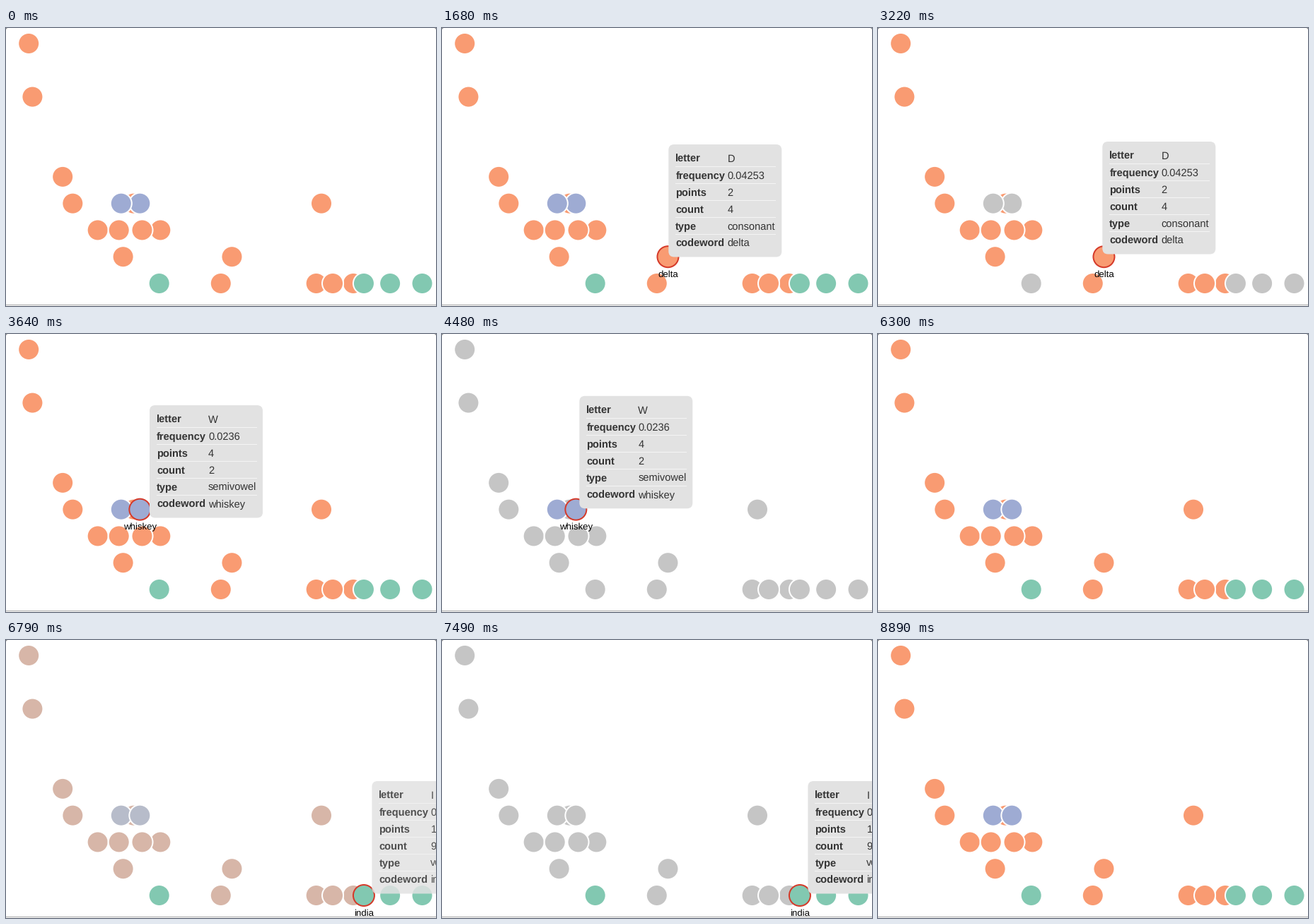
A matplotlib script for the animation above (9380 ms loop, 608 by 394 pixels).

```python
import matplotlib.pyplot as plt
from matplotlib.animation import FuncAnimation
from matplotlib.patches import Circle, FancyBboxPatch, Polygon, Rectangle
from matplotlib.transforms import Affine2D
import numpy as np

W, H, DPI = 608, 394, 100
FRAMES, INTERVAL = 134, 70
PT = 72 / DPI

plt.rcParams["font.family"] = "Liberation Sans"
plt.rcParams["text.hinting"] = "none"

COLORS = {
    "consonant": np.array([249, 155, 114]) / 255,
    "semivowel": np.array([158, 171, 211]) / 255,
    "vowel": np.array([130, 200, 177]) / 255,
}
GRAY = np.array([197, 197, 197]) / 255
RED = "#d53a2a"

# Letters grouped by type in drawing order: letter -> (frequency, points)
LETTERS = {
    "consonant": {
        "B": (.01492, 3), "C": (.02782, 3), "D": (.04253, 2), "F": (.0223, 4),
        "G": (.02015, 2), "H": (.06094, 4), "J": (.00153, 8), "K": (.00772, 5),
        "L": (.04025, 1), "M": (.02406, 3), "N": (.06749, 1), "P": (.01929, 3),
        "Q": (.00095, 10), "R": (.05987, 1), "S": (.06327, 1), "V": (.00978, 4),
        "X": (.0015, 8), "Z": (.00074, 10),
    },
    "semivowel": {"W": (.0236, 4), "Y": (.01974, 4)},
    "vowel": {"A": (.08167, 1), "I": (.06966, 1), "O": (.07507, 1), "U": (.02758, 1)},
}

FIELDS = ["letter", "frequency", "points", "count", "type", "codeword"]
DETAILS = {
    "D": ["D", "0.04253", "2", "4", "consonant", "delta"],
    "W": ["W", "0.0236", "4", "2", "semivowel", "whiskey"],
    "I": ["I", "0.06966", "1", "9", "vowel", "india"],
}

# Hovered letter: first and last frame
HOVERS = {"D": (1, 46), "W": (50, 81), "I": (95, 123)}
# Tooltip fades: in from/to, out from/to
TIP_FADES = {"D": (0, 3, 46, 49), "W": (49, 52, 80, 84), "I": (94, 98, 122, 126)}
# Tooltip corner: start, end, frames of the move
TIP_MOVES = {
    "D": ((320.3, 165), (317.3, 161), 24, 27),
    "W": ((203, 101), (194.3, 87.8), 60, 63),
    "I": ((517.4, 200), (517.4, 200), 95, 98),
}
# Selected type: on from/to, off from/to
SELECTIONS = {
    "consonant": (25, 30, 46, 51),
    "semivowel": (60, 64, 80, 86),
    "vowel": (94, 99, 122, 127),
}
W_RAISED = 50


def ease(k, a, b):
    p = min(max((k - a) / (b - a), 0), 1)
    return p * p * (3 - 2 * p)


def pulse(k, a, b, c, d):
    return ease(k, a, b) - ease(k, c, d)


def position(freq, points):
    return 27.1 + 6874 * freq, 362 - 37.78 * (points - 1)


fig = plt.figure(figsize=(W / DPI, H / DPI), dpi=DPI, facecolor="white")
ax = fig.add_axes([0, 0, 1, 1])
ax.set_xlim(0, W)
ax.set_ylim(H, 0)
ax.axis("off")

# Window edge
ax.add_patch(Rectangle((0, 392), W, 1, fc="#a6a6a6", lw=0))
for x, dx in ((0, 2), (W, -2)):
    ax.add_patch(Polygon([(x, 0), (x + dx, 0), (x, 2)], fc="#8c8c8c", lw=0))

dots, kinds = {}, {}
for kind, members in LETTERS.items():
    for name, spot in members.items():
        dot = Circle(position(*spot), 15, ec="white", lw=2 * PT, zorder=2 + len(dots) / 100)
        dots[name] = ax.add_patch(dot)
        kinds[name] = kind

label = ax.text(0, 0, "", size=13.2 * PT, color="black", ha="center",
                va="baseline", zorder=5)

# Tooltip, built at the origin and moved by a shift
shift = Affine2D()
place = shift + ax.transData
tip = [ax.add_patch(FancyBboxPatch((0, 0), 160, 159.5, fc="#e2e2e2", lw=0, zorder=6,
                                   boxstyle="round,pad=0,rounding_size=8",
                                   transform=place))]
values = []
for i, field in enumerate(FIELDS):
    style = dict(size=14.6 * PT, color="#333333", va="baseline",
                 transform=place, zorder=8, clip_on=True)
    base = 25 + 24 * i
    tip.append(ax.text(10, base, field, weight="bold", **style))
    values.append(ax.text(83, base, "", **style))
    if i < 5:
        tip.append(ax.add_patch(Rectangle((9.7, base + 6), 142, 1, fc="#f4f4f4", lw=0,
                                          transform=place, zorder=7)))
tip += values


def draw_dots(k):
    chosen = {kind: pulse(k, *span) for kind, span in SELECTIONS.items()}
    hovered = next((n for n, (a, b) in HOVERS.items() if a <= k <= b), None)
    for name, dot in dots.items():
        kind = kinds[name]
        dim = sum(v for other, v in chosen.items() if other != kind)
        dot.set_facecolor(COLORS[kind] * (1 - dim) + GRAY * dim)
        dot.set_edgecolor(RED if name == hovered else "white")
    dots["W"].set_zorder(3 if k >= W_RAISED else 2.18)
    label.set_visible(hovered is not None)
    if hovered:
        x, y = dots[hovered].center
        label.set_position((x, y + 29))
        label.set_text(DETAILS[hovered][-1])


def draw_tip(k):
    name = max(TIP_FADES, key=lambda n: pulse(k, *TIP_FADES[n]))
    alpha = pulse(k, *TIP_FADES[name])
    start, end, a, b = TIP_MOVES[name]
    p = ease(k, a, b)
    shift.clear().translate(*(s + (e - s) * p for s, e in zip(start, end)))
    for text, value in zip(values, DETAILS[name]):
        text.set_text(value)
    for part in tip:
        part.set_alpha(alpha)
        part.set_visible(alpha > 0)


def update(k):
    draw_dots(k)
    draw_tip(k)
    return [*dots.values(), label, *tip]


anim = FuncAnimation(fig, update, frames=FRAMES, interval=INTERVAL,
                     repeat=True, repeat_delay=0, blit=False)
plt.show()
```
